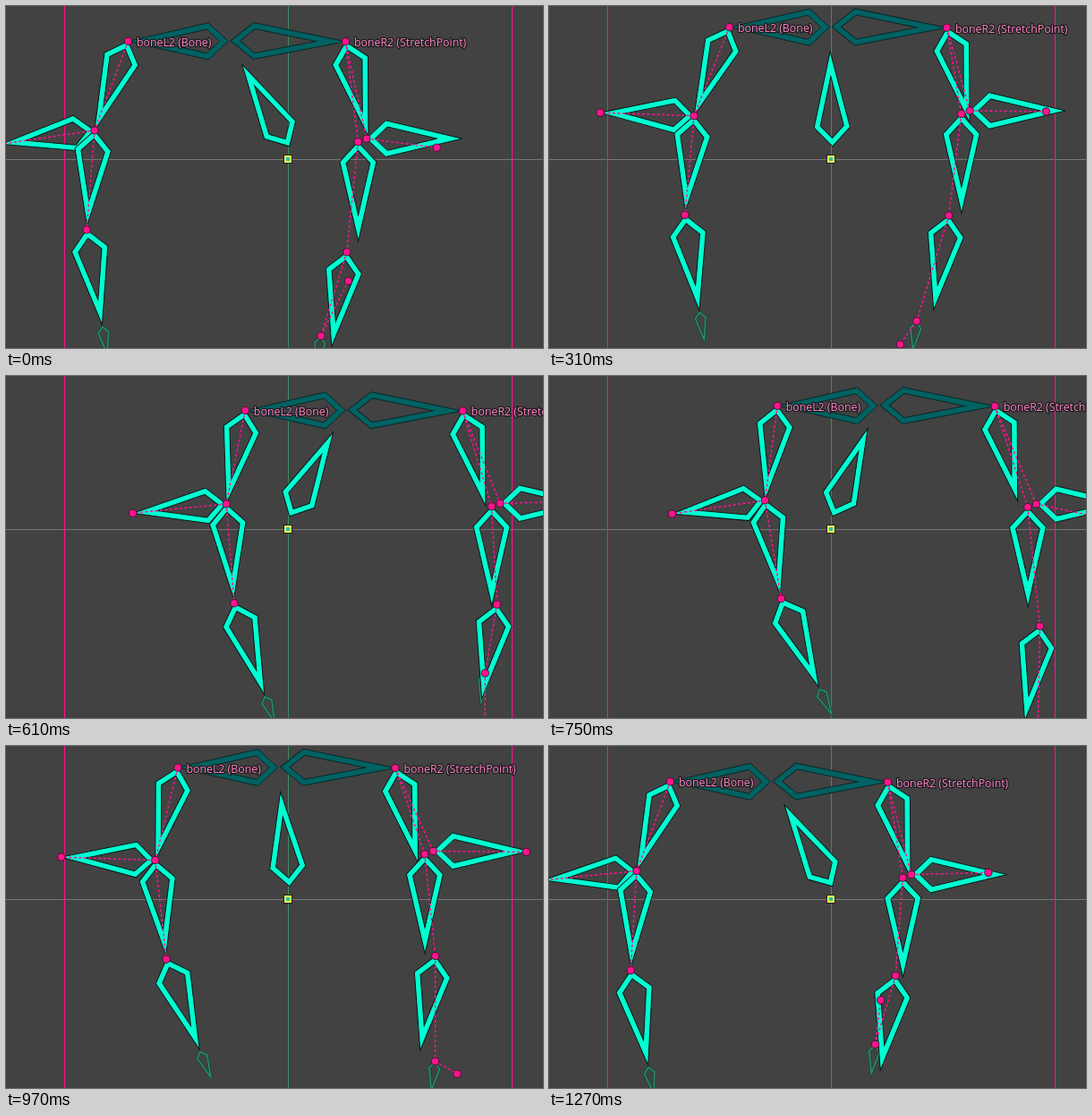
An HTML page with a canvas for the animation above (1330 ms loop, 600 px wide and 382 px high).

```html
<!DOCTYPE html>
<html lang="en">
<head>
<meta charset="utf-8">
<title>Bone rig swing</title>
<style>
  html, body { margin: 0; width: 100%; height: 100%; overflow: hidden; background: #424242; }
  canvas { display: block; }
</style>
</head>
<body>
<canvas id="stage" width="600" height="382"></canvas>
<script>
const ctx = document.getElementById('stage').getContext('2d');

// Uneven opening holds, then a steady 80-80-60 rhythm.
const HOLDS = [80, 60, 80, 90, 60, 80];
for (let i = 0; i < 4; i++) HOLDS.push(80, 80, 60);
const LOOP = HOLDS.reduce((sum, hold) => sum + hold, 0);

const CYAN = '#00ffd2', TEAL = '#006262', GREEN = '#2a9a74', PINK = '#ff148f';

const rad = deg => deg * Math.PI / 180;
const add = (p, q) => [p[0] + q[0], p[1] + q[1]];
const down = (deg, len) => [Math.sin(rad(deg)) * len, Math.cos(rad(deg)) * len];
const up = (deg, len) => [Math.sin(rad(deg)) * len, -Math.cos(rad(deg)) * len];

function kite(start, scale, len, side, half) {
  ctx.moveTo(start, 0);
  ctx.lineTo(start + side * scale, half * scale);
  ctx.lineTo(start + len * scale, 0);
  ctx.lineTo(start + side * scale, -half * scale);
  ctx.closePath();
}

// Hollow kite whose rim has the same thickness all round.
function bone(head, tail, color = CYAN, edge = '#0a1816') {
  const dx = tail[0] - head[0], dy = tail[1] - head[1];
  const len = Math.hypot(dx, dy), side = len * 0.2;
  const half = Math.min(20.5, len * 0.19), rim = half * 0.32;
  const innerHead = rim / Math.sin(Math.atan2(half, side));
  const innerTail = len - rim / Math.sin(Math.atan2(half, len - side));
  ctx.save();
  ctx.translate(head[0], head[1]);
  ctx.rotate(Math.atan2(dy, dx));
  ctx.beginPath();
  kite(0, 1, len, side, half);
  kite(innerHead, (innerTail - innerHead) / len, len, side, half);
  ctx.fillStyle = color;
  ctx.fill('evenodd');
  ctx.lineWidth = 1;
  ctx.lineJoin = 'miter';
  ctx.strokeStyle = edge;
  ctx.stroke();
  ctx.restore();
}

function link(a, b) {
  ctx.beginPath();
  ctx.moveTo(a[0], a[1]);
  ctx.lineTo(b[0], b[1]);
  ctx.setLineDash([3, 2.5]);
  ctx.lineWidth = 1.5;
  ctx.strokeStyle = PINK;
  ctx.stroke();
  ctx.setLineDash([]);
}

function dot(p) {
  ctx.beginPath();
  ctx.arc(p[0], p[1], 4.1, 0, 2 * Math.PI);
  ctx.fillStyle = PINK;
  ctx.fill();
  ctx.lineWidth = 1;
  ctx.strokeStyle = '#4a1030';
  ctx.stroke();
}

function label(text, p) {
  const x = p[0] + 9.5, y = p[1] + 5.5;
  ctx.font = '12.35px "Open Sans", "Noto Sans", sans-serif';
  ctx.lineJoin = 'round';
  ctx.lineWidth = 2.4;
  ctx.strokeStyle = '#1c1c1c';
  ctx.strokeText(text, x, y);
  ctx.fillStyle = '#ff84c6';
  ctx.fillText(text, x, y);
}

function rect(color, x, y, w, h) {
  ctx.fillStyle = color;
  ctx.fillRect(x, y, w, h);
}

function drawGrid() {
  rect('#424242', 0, 0, 600, 382);
  rect('#767676', 0, 171, 600, 1);
  rect(PINK, 65, 0, 1, 382);
  rect('#3c8c64', 315, 0, 1, 382);
  rect(PINK, 565, 0, 1, 382);
}

function drawRig(phase) {
  // rate: swings per loop, lag: degrees into the loop at the peak
  const osc = (rate, amp, lag) => amp * Math.cos(rad(rate * phase - lag));

  const turn = -1.5 + osc(1, 26.5, 166) + osc(2, 0.9, -40);
  const neck = add([315, 171], up(turn, 148.6));

  // Left limb: rigid lengths, swinging angles.
  const upperAngle = -16.5 + osc(1, 6.7, 207) + osc(2, 2.4, 40);
  const foreAngle = 0.8 + osc(1, 7.7, 219) + osc(2, 1.3, 60);
  const lowerAngle = foreAngle + 13.8;
  const sideAngle = 2.7 + osc(2, 6, 20);
  const shoulderL = add(neck, [-113, 0.5]);
  const elbowL = add(shoulderL, down(upperAngle, 106.5));
  const wristL = add(elbowL, down(foreAngle, 111.3));
  const tipL = add(wristL, down(lowerAngle, 107.5));
  const sideL = add(elbowL, down(sideAngle - 90, 105));

  // Right limb: springs that bounce more and later with each joint.
  const spring = (n, x, y) =>
    [x + osc(1, 9 + 3.5 * n, 200 + 12 * n), y + osc(2, 10 * n, 38 * n - 10)];
  const shoulderR = add(neck, [130, 1]);
  const elbowR = add(shoulderR, spring(1, 24.5, 103));
  const wristR = add(elbowR, spring(2, -1, 115));
  const tipR = add(wristR, spring(3, -18, 101));
  const endR = add(tipR, [
    3 + osc(1, 12, 0) + osc(3, 24, 50),
    20 - osc(1, 25, 0) - osc(3, 60, -20)
  ]);
  const handR = add(elbowR, [9.5, -3.5]);
  const sideR = add(handR, [
    90 + osc(1, 10, 240) + osc(2, 8, 215),
    2.5 + osc(2, 18, 65)
  ]);

  bone(add(neck, [-1, 0.5]), shoulderL, TEAL, '#0c2626');
  bone(add(neck, [1.5, 0]), shoulderR, TEAL, '#0c2626');
  const root = [316, 156];
  bone(root, add(root, up(turn * 1.1 - 0.9, 106)));

  bone(add(tipL, [0, 1]), add(tipL, down(lowerAngle * 1.1, 38)), GREEN, '#1e4a3c');
  bone(shoulderL, elbowL);
  bone(elbowL, sideL);
  bone(elbowL, add(elbowL, down(foreAngle, 107)));
  bone(wristL, tipL);

  bone(tipR, add(tipR, [-5, 37]), GREEN, '#1e4a3c');
  bone(shoulderR, add(shoulderR, [25.5, 106]));
  bone(handR, add(handR, [107, 0]));
  bone(elbowR, add(elbowR, [0.3, 111]));
  bone(wristR, add(wristR, [-17, 105.5]));

  link(shoulderL, elbowL);
  link(elbowL, sideL);
  link(elbowL, wristL);
  link(shoulderR, elbowR);
  link(shoulderR, handR);
  link(elbowR, wristR);
  link(wristR, tipR);
  link(tipR, endR);
  link(handR, sideR);
  [shoulderL, elbowL, wristL, sideL, shoulderR, elbowR, handR, wristR, tipR, endR, sideR].forEach(dot);

  label('boneL2 (Bone)', shoulderL);
  label('boneR2 (StretchPoint)', shoulderR);
}

function drawMarker() {
  rect('#202020', 310, 166, 10, 10);
  rect('#ffff50', 311, 167, 8, 8);
  rect('#18c8b0', 313, 169, 4, 4);
}

function draw(step) {
  drawGrid();
  ctx.save();
  ctx.translate(0.8, 0.8);
  drawRig(360 * step / HOLDS.length);
  ctx.restore();
  drawMarker();
}

let shown = -1;
function tick() {
  let rest = performance.now() % LOOP, step = 0;
  while (rest >= HOLDS[step]) rest -= HOLDS[step++];
  if (step !== shown) draw(shown = step);
  requestAnimationFrame(tick);
}
tick();
</script>
</body>
</html>
```
